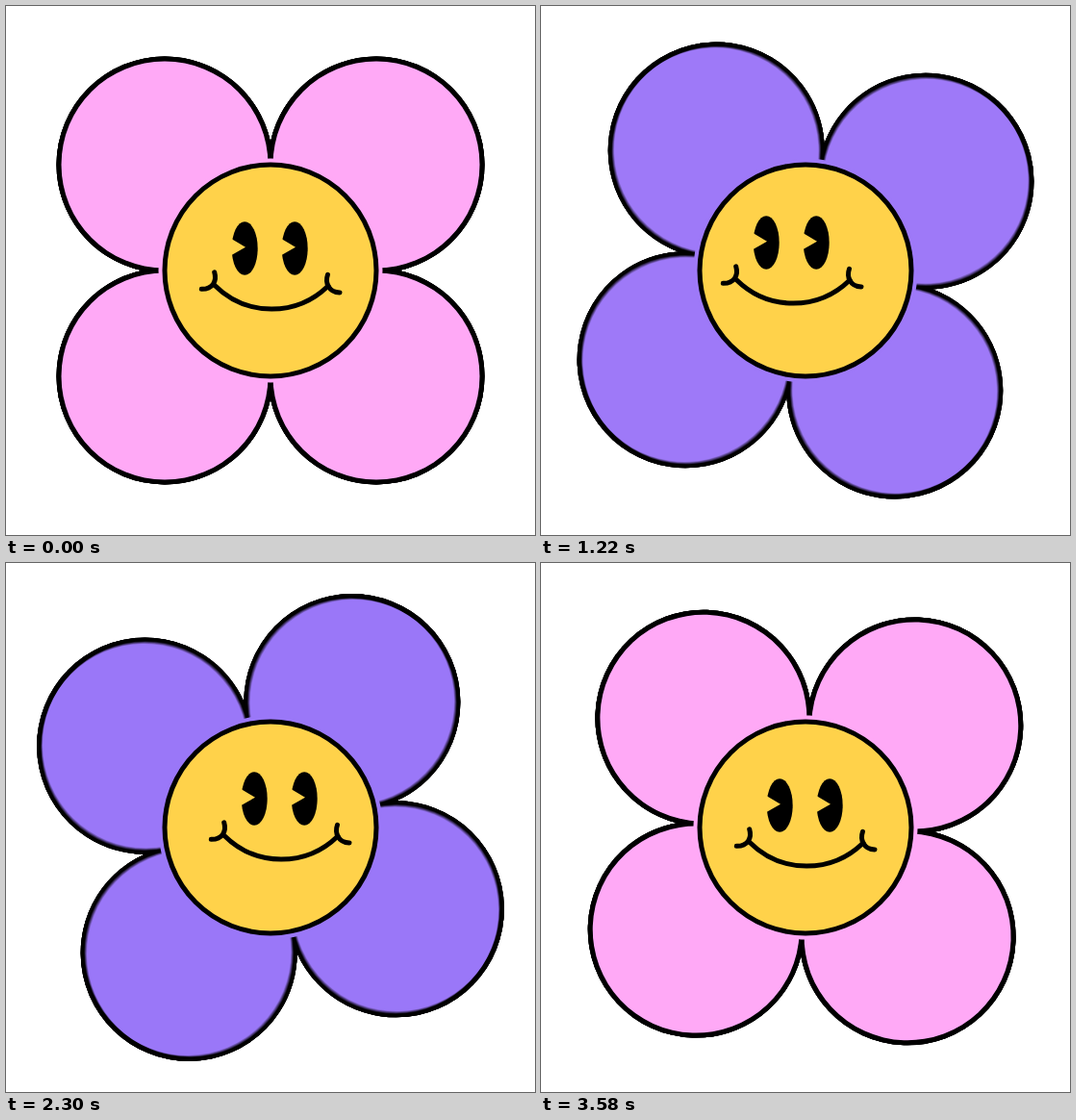
An HTML page for the animation above (3600 ms loop, 550 px wide and 550 px high).

```html
<!DOCTYPE html>
<html lang="en">
<head>
<meta charset="utf-8">
<title>Smiling flower</title>
<style>
  html, body { margin: 0; width: 100%; height: 100%; overflow: hidden; background: #fff; }
  svg { display: block; width: 100vw; height: 100vh; }
</style>
</head>
<body>
<svg viewBox="0 0 550 550" xmlns="http://www.w3.org/2000/svg">
  <defs>
    <g id="rims"></g>
    <g id="fills"></g>
    <clipPath id="outline"></clipPath>
    <g id="eye">
      <ellipse cx="248.2" cy="252" rx="13.5" ry="27.8"/>
      <path d="M249 250.7L231 240V261Z" fill="#ffd24a"/>
    </g>
  </defs>
  <g id="base"></g>
  <g clip-path="url(#outline)"><g id="petals"></g></g>
  <circle cx="275" cy="275" r="110" fill="#ffd24a" stroke="#000" stroke-width="5"/>
  <g id="look">
    <use href="#eye"/>
    <use href="#eye" x="52"/>
    <g fill="none" stroke="#000" stroke-width="5" stroke-linecap="round">
      <path d="M217 290.5C250 323.2 302 323.2 335 291"/>
      <path d="M216.7 276.8C219.5 286 215 294.5 203.3 294.3"/>
      <path d="M334.5 279.3C331.5 288 335.5 297.5 347 298"/>
    </g>
  </g>
</svg>
<script>
const LOOP = 3600, STEP = 20, SPIN = 3560, TURN = 362;
const SHUTTER = 10, SAMPLES = 8;
const PINK = [255, 170, 247], VIOLET = [130, 110, 248];
// start, end, x, y of each glance
const GLANCES = [[800, 1060, -14, -6], [1960, 2220, 10, -7], [3120, 3380, 0, 0]];

const $ = id => document.getElementById(id);
const ease = x => {
  x = Math.min(1, Math.max(0, x));
  return x * x * (3 - 2 * x);
};
const mix = (a, b, k) => a + (b - a) * k;
const angle = t => TURN * ease(t / SPIN);
const rotate = a => `rotate(${a} 275 275)`;

const circles = r => [[165, 165], [385, 165], [385, 385], [165, 385]]
  .map(([x, y]) => `<circle cx="${x}" cy="${y}" r="${r}"/>`).join("");

$("rims").innerHTML = circles(120);
$("fills").innerHTML = circles(107.5) + '<circle cx="275" cy="275" r="116.5"/>';
$("base").innerHTML = circles(112.5);
$("outline").innerHTML = circles(112.5);

// Each layer's opacity 1/n makes the stack an even average (motion blur).
$("petals").innerHTML = Array.from({ length: SAMPLES }, (_, i) =>
  `<g opacity="${1 / (i + 1)}"><use href="#rims" fill="#000"/><use href="#fills"/></g>`).join("");
const layers = [...$("petals").children];
const outline = [...$("outline").children];

function draw(t) {
  const mid = rotate(angle(t));
  $("base").setAttribute("transform", mid);
  outline.forEach(c => c.setAttribute("transform", mid));

  layers.forEach((g, i) => {
    const dt = ((i + 0.5) / SAMPLES - 0.5) * SHUTTER;
    g.setAttribute("transform", rotate(angle(t + dt)));
  });

  const k = ease(1 - Math.abs(t / (SPIN / 2) - 1));
  const rgb = PINK.map((c, i) => Math.round(mix(c, VIOLET[i], k)));
  $("petals").setAttribute("fill", `rgb(${rgb})`);

  let x = 0, y = 0;
  for (const [from, to, gx, gy] of GLANCES) {
    const p = ease((t - from) / (to - from));
    x = mix(x, gx, p);
    y = mix(y, gy, p);
  }
  $("look").setAttribute("transform", `translate(${x} ${y})`);
}

const start = performance.now();
function tick() {
  const t = (performance.now() - start) % LOOP;
  draw(Math.floor(t / STEP) * STEP);
  requestAnimationFrame(tick);
}
tick();
</script>
</body>
</html>
```
